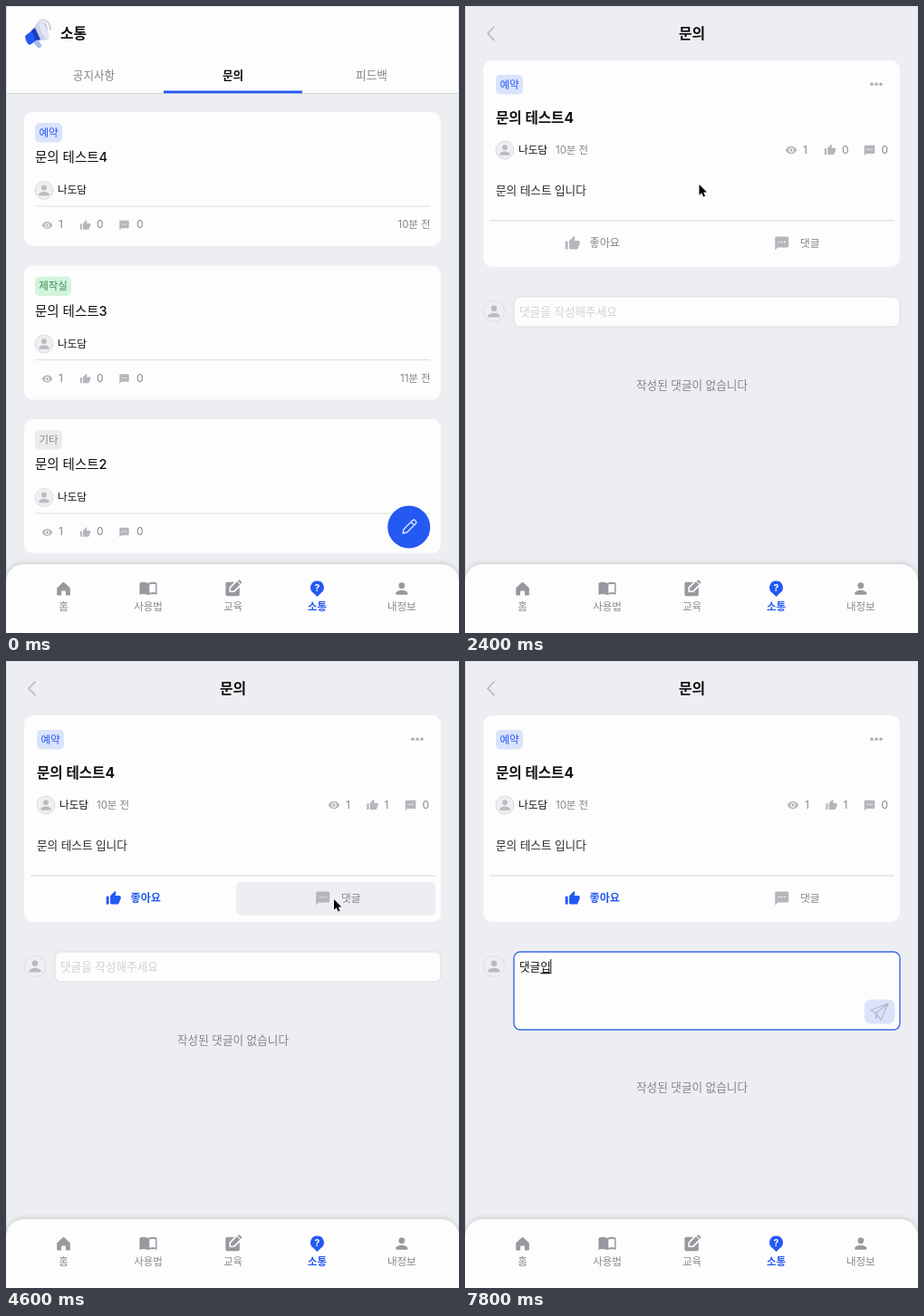
Write an HTML page that moves like this. It is 500 px wide and 692 px high and loops after 8000 ms.

```html
<!DOCTYPE html>
<html lang="ko">
<head>
<meta charset="utf-8">
<title>소통</title>
<style>
html, body { margin: 0; width: 100%; height: 100%; overflow: hidden; background: #edeef2; }
svg { display: block; width: 500px; height: 692px; }
text { font-family: Inter, "Noto Sans CJK KR", "Noto Sans CJK", sans-serif; white-space: pre; }
</style>
</head>
<body>
<svg id="stage" viewBox="0 0 500 692"></svg>
<script>
const LOOP = 8000, STEP = 100;
const BLUE = '#2459f2', WHITE = '#fdfdfd', BG = '#edeef2', GREY = '#858589', ICON = '#b4b6bc', INK = '#111';
const AUTHOR = '나도담';

const ICONS = {
  eye: 'M12 4.5C7 4.5 2.73 7.6 1 12c1.73 4.4 6 7.5 11 7.5s9.27-3.1 11-7.5c-1.73-4.4-6-7.5-11-7.5zM12 17a5 5 0 1 1 0-10 5 5 0 0 1 0 10zm0-8a3 3 0 1 0 0 6 3 3 0 0 0 0-6z',
  thumb: 'M1 21h4V9H1zM23 10c0-1.1-.9-2-2-2h-6.3l1-4.6c.1-.5-.1-1-.4-1.4L14.2 1 7.6 7.6C7.2 8 7 8.5 7 9v10c0 1.1.9 2 2 2h9c.8 0 1.5-.5 1.8-1.2l3-7c.1-.3.2-.5.2-.8z',
  chat: 'M20 2H4a2 2 0 0 0-2 2v18l4-4h14a2 2 0 0 0 2-2V4a2 2 0 0 0-2-2zM9 11H7V9h2zm4 0h-2V9h2zm4 0h-2V9h2z',
  home: 'M3 11l8-7.3q1-.9 2 0l8 7.3v9q0 1.300-1.300 1.300H15v-5.300q0-1-1-1h-4q-1 0-1 1v5.300H4.300Q3 21.300 3 20z',
  person: 'M12 12a4 4 0 1 0 0-8 4 4 0 0 0 0 8zM4 18.500c0-3 5-4.500 8-4.500s8 1.500 8 4.500q0 1.500-1.500 1.500h-13q-1.500 0-1.500-1.500z',
  book: 'M.5 4.500Q6 2 12 4.800 18 2 23.500 4.500V20Q18 18 12 20.500 6 18 .5 20zM13.500 6.500v11.300q4-1.500 8.200-.5V6.200q-4-1.300-8.200.3z',
  edit: 'M4 3h10l-7 7v7h7l7-7v10q0 2-2 2H4q-2 0-2-2V5q0-2 2-2zM9 11l8.500-8.500 4 4L13 15H9zM18.500 1.500l1-1q1-.8 2 0l2 2q.8 1 0 2l-1 1z',
};

const rect = (x, y, w, h, r, fill, extra = '') =>
  `<rect x="${x}" y="${y}" width="${w}" height="${h}" rx="${r}" fill="${fill}" ${extra}/>`;
// y is the optical middle of the line
const text = (x, y, str, size, fill = INK, weight = 400, anchor = 'start', id = '') =>
  `<text ${id && `id="${id}"`} x="${x}" y="${y + size * .37}" font-size="${size}" font-weight="${weight}" fill="${fill}" text-anchor="${anchor}">${str}</text>`;
const path = (d, attrs) => `<path d="${d}" ${attrs}/>`;
const stroke = (d, color, w, extra = '') =>
  path(d, `fill="none" stroke="${color}" stroke-width="${w}" stroke-linecap="round" stroke-linejoin="round" ${extra}`);
const icon = (name, cx, cy, size, fill = ICON, id = '') =>
  path(ICONS[name], `${id && `id="${id}"`} fill="${fill}" fill-rule="evenodd" transform="translate(${cx - size / 2} ${cy - size / 2}) scale(${size / 24})"`);
const line = (x1, x2, y, color = '#dfe0e3') => rect(x1, y - .5, x2 - x1, 1, 0, color);
const avatar = (cx, cy, r) =>
  `<circle cx="${cx}" cy="${cy}" r="${r - .5}" fill="#eeeff1" stroke="#dcdde0"/>` + icon('person', cx, cy, r * 1.65, '#b9bbc1');
const badge = (x, y, label, w, bg, fg) =>
  rect(x, y, w, 21.500, 5, bg) + text(x + w / 2, y + 10.500, label, 11.500, fg, 500, 'middle');
const group = (id, body) => `<g id="${id}">${body}</g>`;

function postCard(y, label, w, bg, fg, title, ago) {
  const stats = [['eye', 45.500, 58, 1], ['thumb', 87.500, 100, 0], ['chat', 130.500, 144, 0]]
    .map(([name, ix, nx, n]) => icon(name, ix, y + 125, 12.500) + text(nx, y + 124, n, 12, GREY)).join('');
  return rect(20, y, 460, 148, 10, WHITE) + badge(32, y + 12, label, w, bg, fg) +
    text(32, y + 50, title, 14.500, INK, 500) + avatar(42, y + 86.500, 10.500) +
    text(57, y + 86, AUTHOR, 11.600, INK, 500) + line(32, 468, y + 104) + stats +
    text(468.500, y + 124, ago, 11.400, GREY, 400, 'end');
}

function megaphone() {
  return path('M28 27L38 14Q42 16 45 24T47 37L33 39z', 'fill="#ccd3ea"') +
    path('M38 14Q35 19 39 28T47 37Q49 33 45 24T38 14z', 'fill="#e3e7f4"') +
    path('M21 33L30 26 36 37 26 43Q22 41 21 33z', `fill="${BLUE}"`) +
    path('M28 27L32 24 38 37 33 39z', 'fill="#183dbb"') +
    path('M30 40L35 37 40 44 36 47z', 'fill="#a9b9ee"') +
    stroke('M42 19Q45 21 45 25M41 15Q49 17 49 26', '#c9cdd8', 1.800);
}

function listPage() {
  return rect(0, 0, 500, 96, 0, WHITE) + line(0, 500, 96.500, '#d8d9dd') + megaphone() +
    text(60, 30, '소통', 15.800, INK, 700) +
    text(97, 76.500, '공지사항', 12.600, GREY, 400, 'middle') +
    text(250.500, 76.500, '문의', 12.600, INK, 700, 'middle') +
    text(403.500, 76.500, '피드백', 12.600, GREY, 400, 'middle') +
    rect(174, 93.500, 153, 2.800, 0, BLUE) +
    postCard(117, '예약', 30, '#dae3fc', BLUE, '문의 테스트4', '10분 전') +
    postCard(286.500, '제작실', 40, '#d2f4dc', '#3b8a55', '문의 테스트3', '11분 전') +
    postCard(456, '기타', 30, '#ececef', '#8a8a8e', '문의 테스트2', '12분 전') +
    `<circle cx="444.700" cy="575" r="23.500" fill="${BLUE}"/>` +
    stroke('M438 582l1-4.500 10-10q1.300-1 2.500.200l.800.800q1.200 1.200.2 2.500l-10 10zM447 569.500l3.500 3.500', '#dfe7ff', 1.300);
}

function pageHeader() {
  return stroke('M32 23L25 30.300 32 37.500', '#bcbdc1', 1.800) + text(250.500, 30, '문의', 15.900, INK, 700, 'middle');
}

function spinner() {
  const arc = 2 * Math.PI * 15;
  return '<circle cx="250.500" cy="337" r="15" fill="none" stroke="#d9dadd" stroke-width="4"/>' +
    `<circle id="arc" cx="250.500" cy="337" r="15" fill="none" stroke="#89898c" stroke-width="4" stroke-dasharray="${arc / 4} ${arc}"/>`;
}

function detailPage() {
  const dots = [449, 454, 459].map(x => `<circle cx="${x}" cy="86.300" r="1.800" fill="#acaeb4"/>`).join('');
  return rect(20, 60, 460, 228, 10, WHITE) + badge(34, 76, '예약', 30, '#dae3fc', BLUE) + dots +
    text(34, 123, '문의 테스트4', 15.600, INK, 700) + avatar(44, 159, 10.500) +
    text(59, 159, AUTHOR, 11.600, INK, 500) + text(100, 159, '10분 전', 11.400, GREY) +
    group('views', icon('eye', 360, 159, 13.500) + text(373, 159, 1, 12, GREY)) +
    group('likes', icon('thumb', 403, 159, 13.500) + text(416, 159, 0, 12, GREY, 400, 'start', 'likeCount')) +
    icon('chat', 446.500, 159.500, 14) + text(459.500, 159, 0, 12, GREY) +
    text(34, 203.500, '문의 테스트 입니다', 12.600, '#2a2a2c') + line(27, 474, 237, '#d8d9dc') +
    rect(27, 244, 220, 37, 5, BG, 'id="likeHover"') + rect(254, 244, 220, 37, 5, BG, 'id="replyHover"') +
    icon('thumb', 118.700, 262, 17.500, ICON, 'likeIcon') + text(137.500, 262, '좋아요', 12.100, GREY, 400, 'start', 'likeLabel') +
    icon('chat', 349.700, 262, 18) + text(370, 262, '댓글', 11.700, GREY) +
    avatar(32, 337, 12) + rect(54, 321, 426, 33, 7, WHITE, 'id="box"') +
    text(60, 337, '', 12.600, '#d0d1d5', 400, 'start', 'entry') +
    rect(0, 344, 12, 1.200, 0, INK, 'id="underline"') + rect(0, 329, 1, 16, 0, INK, 'id="caret"') +
    group('send', rect(441, 373.500, 33.500, 27, 7, '#dbe3fb') +
      stroke('M467 378L448 385.500 453.500 388.500 459 396zM467 378L453.500 388.500V394L456 391.500', '#b4bbcb', 1.300)) +
    text(250.500, 418, '작성된 댓글이 없습니다', 12.600, GREY, 400, 'middle', 'empty');
}

function navBar() {
  const items = [['home', 63.500, '홈', 19.500], ['book', 157, '사용법', 20], ['edit', 250.500, '교육', 19.500], ['', 343.500, '소통', 0], ['person', 436.800, '내정보', 20]];
  return rect(0, 616, 500, 100, 20, WHITE, 'filter="url(#shadow)"') + items.map(([name, x, label, size]) =>
    (name ? icon(name, x, 643, size, '#97999f')
      : path('M343.500 634.500a7.300 7.300 0 0 1 4 13.500l-4 4-4-4a7.300 7.300 0 0 1 4-13.500z', `fill="${BLUE}"`) +
        text(x, 642, '?', 10.500, WHITE, 700, 'middle')) +
    text(x, 662.500, label, 11.500, name ? '#88898e' : BLUE, name ? 400 : 700, 'middle')).join('');
}

const stage = document.getElementById('stage');
stage.innerHTML = '<defs><filter id="shadow" x="-5%" y="-20%" width="110%" height="140%"><feDropShadow dx="0" dy="-1" stdDeviation="2.500" flood-color="#333" flood-opacity=".22"/></filter></defs>' +
  rect(0, 0, 500, 692, 0, BG) + group('list', listPage()) + group('header', pageHeader()) +
  group('loading', spinner()) + group('detail', detailPage()) + line(0, 500, .5, '#dedfe2') +
  rect(0, 0, 1, 692, 0, '#dadbde') + rect(499, 0, 1, 692, 0, '#e3e4e7') + navBar() +
  group('cursor', path('M0 0v11.800l2.700-2.500 1.900 4.300 2-.9-1.900-4.100h3.700z', 'fill="#000" stroke="#fff" stroke-width="1.100" paint-order="stroke"'));

const el = id => document.getElementById(id);
const set = (id, attrs) => { for (const k in attrs) el(id).setAttribute(k, attrs[k]); };
const show = (id, on) => set(id, { visibility: on ? 'visible' : 'hidden' });
const clamp = v => Math.min(1, Math.max(0, v));
const ease = v => (v = clamp(v), v * v * (3 - 2 * v));

const OPEN = 1500, LOADED = 2300, LIKED = 3700, FOCUS = 5080, TYPING = 6400, KEY = 160;
const KEYS = ['ㄷ', '대', '댓', '댓ㄱ', '댓그', '댓글', '댓글ㅇ', '댓글이', '댓글입'];
const POINTER = [[600, 420, 300], [1000, 258.500, 197], [2700, 258.500, 197], [3100, 150, 255.500], [3800, 150, 255.500],
  [4100, 235.500, 269], [4500, 362, 263], [4950, 362, 263], [5200, 323.500, 197]];

function pointerAt(t) {
  const next = POINTER.findIndex(p => p[0] > t);
  if (next < 1) return (next ? POINTER.at(-1) : POINTER[0]).slice(1);
  const [a, b] = [POINTER[next - 1], POINTER[next]];
  const k = ease((t - a[0]) / (b[0] - a[0]));
  return [a[1] + (b[1] - a[1]) * k, a[2] + (b[2] - a[2]) * k];
}

function drawEntry(t) {
  const count = Math.min(KEYS.length, Math.floor((t - TYPING) / KEY) + 1);
  const typed = count > 0 ? KEYS[count - 1] : '';
  const entry = el('entry');
  entry.textContent = typed || '댓글을 작성해주세요';
  set('entry', { fill: typed ? INK : '#d0d1d5' });
  show('caret', typed);
  show('underline', typed);
  if (!typed) return;
  const end = 60 + entry.getComputedTextLength();
  const last = entry.getSubStringLength(typed.length - 1, 1);
  set('caret', { x: end - .5 });
  set('underline', { x: end - last, width: last });
}

function drawDetail(t, [x, y]) {
  const liked = t >= LIKED, focused = t >= FOCUS;
  const over = (left, right) => x > left && x < right && y > 244 && y < 281;
  set('likeHover', { opacity: +over(27, 247) });
  set('replyHover', { opacity: +over(254, 474) });
  el('likeCount').textContent = +liked;
  set('views', { transform: `translate(${liked ? 2 : 0} 0)` });
  set('likes', { transform: `translate(${liked ? 1.500 : 0} 0)` });
  set('likeIcon', { fill: liked ? BLUE : ICON });
  set('likeLabel', { fill: liked ? BLUE : GREY, 'font-weight': liked ? 700 : 400 });

  const grow = 53 * ease((t - FOCUS) / 280);
  set('box', { height: 33 + grow, stroke: focused ? '#3a6be6' : '#dadbdf', 'stroke-width': focused ? 1.400 : 1 });
  set('empty', { transform: `translate(0 ${grow * .98})` });
  set('send', { opacity: +(grow >= 53) });
  drawEntry(t);
}

function render(t) {
  const loaded = t >= LOADED, pointer = pointerAt(t);
  el('list').style.display = t < OPEN ? '' : 'none';
  el('header').style.display = t >= OPEN ? '' : 'none';
  el('loading').style.display = t >= OPEN && !loaded ? '' : 'none';
  el('detail').style.display = loaded ? '' : 'none';
  set('arc', { transform: `rotate(${30 + (t - 1800) * .36} 250.500 337)` });
  if (loaded) drawDetail(t, pointer);
  show('cursor', t >= POINTER[0][0] && t < TYPING);
  set('cursor', { transform: `translate(${pointer})` });
}

const start = performance.now();
function tick() {
  const t = (performance.now() - start) % LOOP;
  render(Math.floor(t / STEP) * STEP);
  requestAnimationFrame(tick);
}
tick();
</script>
</body>
</html>
```
